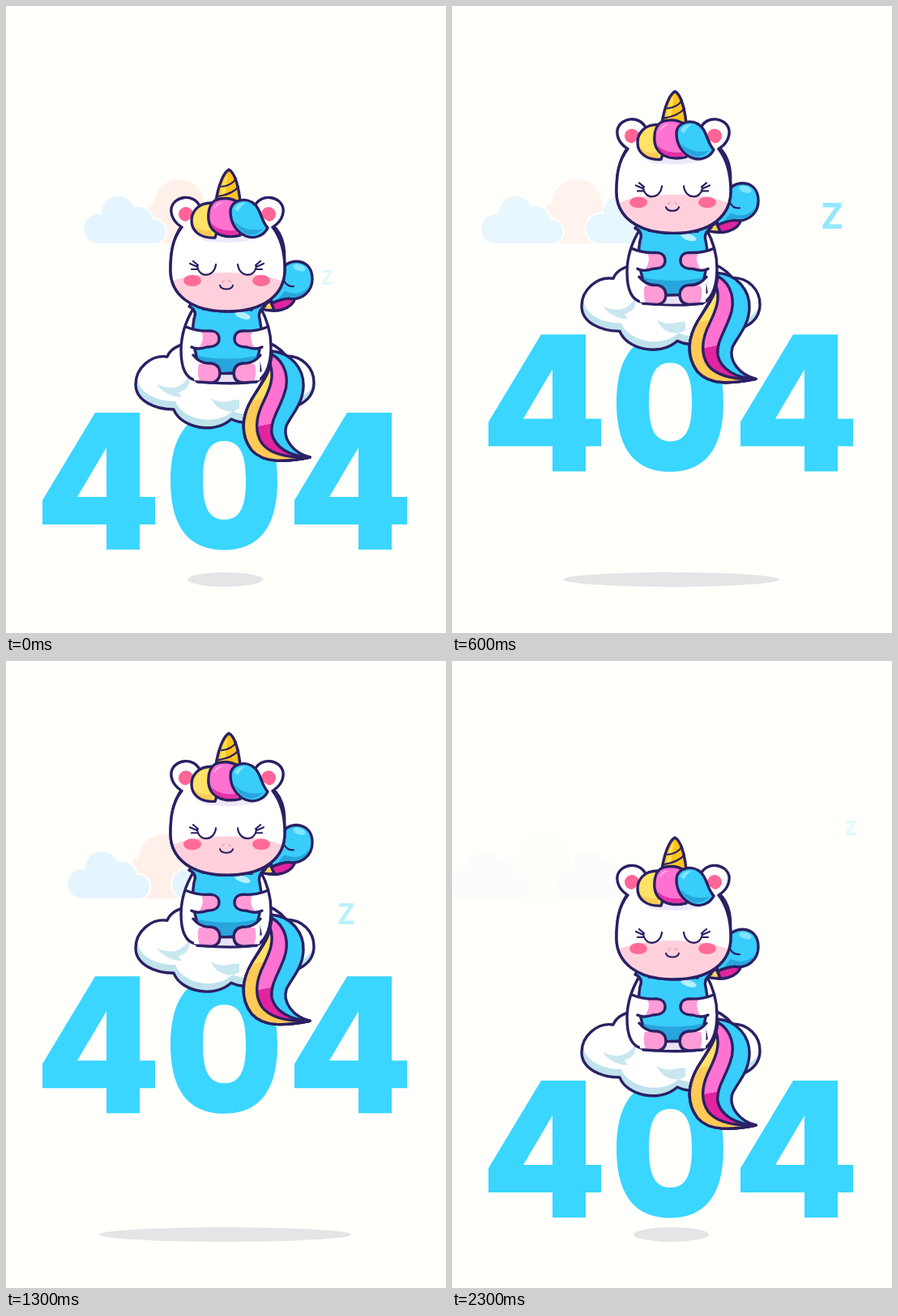
Write an HTML page that moves like this. It is 543 px wide and 774 px high and loops after 2.4 s.

```html
<!DOCTYPE html>
<html lang="en">
<head>
<meta charset="utf-8">
<title>404</title>
<style>
html, body { margin: 0; width: 100%; height: 100%; overflow: hidden; background: #fffffc; }
svg { display: block; width: 543px; height: 774px; }
.line { stroke: #2b2063; stroke-width: 3.4; stroke-linecap: round; stroke-linejoin: round; }
.thin { stroke-width: 2.2; }
.open { fill: none; }
.blue { fill: #38cdfb; }
.deep { fill: #27a5dc; }
.shine { fill: #7fe4ff; }
.pink { fill: #ff72d2; }
.skin { fill: #ff9bd6; }
.white { fill: #fff; }
#z { font: 700 25px "Open Sans", "Noto Sans", sans-serif; text-anchor: middle; fill: #3ad6ff; }
</style>
</head>
<body>
<svg viewBox="0 0 543 774">
  <defs>
    <path id="puff" d="M18 294A19 19 0 0 1 23 256A21.3 21.3 0 0 1 64 247A20 20 0 0 1 88 263A15.7 15.7 0 0 1 92 294Z" fill="#e4f5ff" stroke="#fffffc" stroke-width="2"/>
    <path id="seat" d="M199 433C179 430 160 447 160 467C160 487 183 498 207 498C215 520 256 530 278 510C295 518 320 514 330 495C350 502 380 490 380 465C380 447 366 432 346 432C330 412 300 405 270 415C240 412 206 414 199 433Z"/>
    <path id="face" d="M217 271C205 288 203 306 203 326C203 356 228 377 273 377C319 377 344 356 344 325C344 303 339 286 329 271C312 248 236 248 217 271Z"/>
    <path id="pillow" d="M232 386C235 379 233 374 226 371C230 364 239 364 243 374Q273 371 303 375C306 365 314 364 320 370C314 374 311 379 313 386Q318 408 311 432L314 450Q272 456 234 452L235 432Q228 408 232 386Z"/>
    <path id="four" d="M110 502H165V606H184V640H165V671H124V640H45V610ZM124 545L88 606H124Z" fill-rule="evenodd"/>
    <clipPath id="inSeat"><use href="#seat"/></clipPath>
    <clipPath id="inFace"><use href="#face"/></clipPath>
    <clipPath id="inPillow"><use href="#pillow"/></clipPath>
    <linearGradient id="tailPink" gradientUnits="userSpaceOnUse" x1="300" y1="516" x2="302" y2="526">
      <stop offset=".5" stop-color="#ff72d2"/><stop offset=".5" stop-color="#e2249f"/>
    </linearGradient>
    <linearGradient id="tailGold" gradientUnits="userSpaceOnUse" x1="300" y1="484" x2="302" y2="492">
      <stop offset=".5" stop-color="#ffe266"/><stop offset=".5" stop-color="#ffca55"/>
    </linearGradient>

    <!-- Left-hand parts, mirrored for the right -->
    <g id="ear">
      <path class="line white" d="M219 274C207 268 203 258 204 250C207 234 232 231 239 247Z"/>
      <circle cx="222" cy="257" r="9" fill="#ff6596"/>
    </g>
    <g id="eye">
      <ellipse cx="230" cy="339" rx="11" ry="7" fill="#ff6b98"/>
      <path class="line open thin" d="M236 320C237 336 257 336 259 319M237 325L229 325M236 322L227 318M237 320L231 315"/>
    </g>
    <g id="limbs">
      <path class="white" d="M224 397Q240 402 252 401C260 401 263 406 263 411C263 418 256 421 248 421Q238 424 224 423Z"/>
      <path class="skin" d="M241 401H252C260 401 263 406 263 411C263 418 256 421 248 421L238 422Q246 411 241 401Z"/>
      <path class="line open" d="M222 396Q236 402 252 401C260 401 263 406 263 411C263 418 256 421 248 421Q236 425 229 421"/>
      <path class="white" d="M231 432Q240 442 252 441Q264 442 264 454Q263 465 252 465L232 462Z"/>
      <path class="skin" d="M238 442Q252 440 258 442Q264 446 264 454Q263 465 252 465L239 463Q235 452 238 442Z"/>
      <path class="line open" d="M231 431Q240 442 252 441Q264 442 264 454Q263 465 252 465L236 464"/>
    </g>
  </defs>

  <g id="sky">
    <g fill="#fff1ea">
      <circle cx="120" cy="245" r="31"/>
      <rect x="81" y="244" width="84" height="49.5" rx="6"/>
    </g>
    <use href="#puff" x="129"/>
    <use href="#puff"/>
  </g>
  <ellipse id="shadow" cx="270.5" cy="708" ry="9" fill="#e5e5e7"/>
  <text id="z">Z</text>

  <g id="float">
    <g fill="#3ad6ff" role="img" aria-label="404">
      <use href="#four"/>
      <path fill-rule="evenodd" d="M203 586C203 527 228 500 269.5 500S335 527 335 586S311 671.5 269 671.5S203 645 203 586ZM243 586C243 618 250 634 269.5 634S296 618 296 586S289 537 269.5 537S243 553 243 586Z"/>
      <use href="#four" x="311"/>
    </g>

    <!-- Cloud seat -->
    <use href="#seat" fill="#bfe2ec"/>
    <g clip-path="url(#inSeat)"><use href="#seat" class="white" x="2" y="-10"/></g>
    <g fill="#c9e7ef">
      <path d="M186 467Q196 472 208 471Q220 468 226 457Q229 472 213 477L217 483Q197 482 186 467Z"/>
      <path d="M253 484Q263 490 273 488Q281 486 288 486V497Q280 502 272 500Q258 497 253 484Z"/>
    </g>
    <use href="#seat" class="line open"/>

    <!-- Tail -->
    <g class="line">
      <path class="blue" d="M328 426C352 428 368 448 367 470C366 492 352 505 346 518C341 535 355 552 375 557C345 563 318 565 303 548C288 528 292 505 303 486C314 468 326 452 328 426Z"/>
      <path fill="url(#tailPink)" d="M328 430C346 440 350 462 343 480C336 500 326 512 328 528C332 545 350 556 375 557C345 563 318 565 303 548C288 528 292 505 303 486C314 468 326 452 328 430Z"/>
      <path fill="url(#tailGold)" d="M326 442C332 460 324 475 318 488C308 508 306 525 316 540C326 553 345 558 375 557C345 563 318 565 303 548C288 528 292 505 303 486C314 468 324 456 326 442Z"/>
    </g>

    <!-- Mane behind the head -->
    <g class="line">
      <path fill="#e2249f" d="M314 373C332 380 353 375 357 360L325 354Z"/>
      <path fill="#ffd65c" d="M314 373Q323 377 331 375L326 364Z"/>
      <path class="blue" d="M322 266C340 275 346 296 343 322C352 311 378 312 378 337C378 353 364 364 349 361Q338 362 328 367L316 300Z"/>
      <path class="open thin" d="M343 339Q347 347 355 346"/>
    </g>
    <path class="deep" d="M344 352Q362 360 374 346Q366 362 349 359L336 361Z"/>
    <ellipse class="shine" cx="362" cy="323" rx="8" ry="4" transform="rotate(18 362 323)"/>

    <!-- Body and pillow -->
    <path class="line white" d="M232 372C221 390 216 407 216 425C216 450 224 460 234 462C255 467 300 467 312 462C322 455 327 440 327 420C327 400 321 385 314 372Z"/>
    <path d="M262 455H283L286 464H260Z" fill="#e7e1f3"/>
    <use href="#pillow" class="blue"/>
    <g clip-path="url(#inPillow)"><path class="deep" d="M228 430Q272 441 318 430V460H228Z"/></g>
    <ellipse cx="292" cy="382" rx="10" ry="4" fill="#b5f0ff" transform="rotate(18 292 382)"/>
    <use href="#pillow" class="line open"/>
    <use href="#limbs"/>
    <use href="#limbs" transform="matrix(-1 0 0 1 545 0)"/>

    <!-- Head -->
    <use href="#face" class="line white"/>
    <use href="#ear"/>
    <use href="#ear" transform="matrix(-1 0 0 1 546 0)"/>
    <use href="#face" class="white"/>
    <g clip-path="url(#inFace)">
      <ellipse cx="273" cy="364" rx="95" ry="35" fill="#ffd0dc"/>
      <path d="M232 278Q240 292 258 291Q280 294 308 288L316 276Z" fill="#eee8fa"/>
    </g>
    <path class="line open" d="M217 273C205 288 203 306 203 326C203 356 228 377 273 377C319 377 344 356 344 325C344 303 339 286 329 273"/>
    <use href="#eye"/>
    <use href="#eye" transform="matrix(-1 0 0 1 545 0)"/>
    <path class="line open thin" d="M264 345C266 351 278 351 280 345"/>
    <path d="M267 341l2-2M275 339l2 2" stroke="#ff9db8" stroke-width="1.8" stroke-linecap="round"/>

    <!-- Horn -->
    <path class="line" fill="#ffc31f" d="M259 241C262 222 268 206 275 202C282 205 287 222 289 241Z"/>
    <path d="M264 234Q267 214 274 207Q272 220 270 236Z" fill="#ffe04f"/>
    <path class="line open thin" d="M266 223Q278 222 284 213M262 235Q280 232 287 223"/>

    <!-- Fringe -->
    <path class="line" fill="#ffe266" d="M254 243C237 243 229 254 229 265C229 278 240 287 258 286L266 260Z"/>
    <path d="M232 271Q240 280 254 277V284Q237 284 232 271Z" fill="#ffca55"/>
    <path class="line pink" d="M264 238C252 240 249 252 250 264C252 280 268 288 289 283L296 254C288 239 276 236 264 238Z"/>
    <path d="M253 268Q263 279 283 277L287 282Q259 286 253 268Z" fill="#e62fa6"/>
    <path d="M256 252Q258 242 268 242Q260 246 256 252Z" fill="#ffb0e8"/>
    <path class="line blue" d="M277 254C277 239 297 235 307 245C315 252 314 264 323 274C318 284 306 288 296 284C284 279 277 267 277 254Z"/>
    <path class="deep" d="M282 266Q296 280 318 275Q306 286 296 281Q287 277 282 266Z"/>
    <path class="shine" d="M282 250Q286 242 296 243Q290 246 286 254Z"/>
  </g>
</svg>
<script>
const $ = id => document.getElementById(id);

// Linear interpolation through [position, value] points
function track(x, points) {
  let i = 1;
  while (i < points.length - 1 && x > points[i][0]) i++;
  const [[x0, y0], [x1, y1]] = [points[i - 1], points[i]];
  return y0 + (y1 - y0) * (x - x0) / (x1 - x0);
}

const LOOP = 2400, STEP = 100;
const beats = [[0, 0], [1500, 15], [1800, 17], [1900, 18], [2300, 21], [2400, 22]];
const bob = [[0, 0], [10, -161], [21, 16], [22, 0]];
const spread = [[-161, 445], [-74, 204], [0, 93], [17, 93]];
const zX = [[0, 396.5], [4, 443.5], [7, 482], [8, 486], [11, 495]];
const zY = [[0, 334.5], [4, 290], [7, 244], [8, 230], [11, 194]];

function draw(now) {
  const time = Math.floor(now % LOOP / STEP) * STEP;
  const beat = track(time, beats), drift = beat % 11;

  const lift = track(beat, bob);
  $("float").setAttribute("transform", `translate(0 ${lift})`);
  $("shadow").setAttribute("rx", track(lift, spread) / 2);

  $("sky").setAttribute("transform", `translate(${94 - 10 * drift} 0)`);
  $("sky").setAttribute("opacity", Math.min(1, 1 - (drift - 5) * .175));

  const swell = 5 - Math.abs(drift - 5), height = 18 + 3.5 * swell, z = $("z");
  z.style.fontSize = height / .714 + "px";
  z.setAttribute("x", track(drift, zX));
  z.setAttribute("y", track(drift, zY) + height / 2);
  z.setAttribute("opacity", Math.max(0, .14 + .1 * swell));

  requestAnimationFrame(draw);
}
draw(performance.now());
</script>
</body>
</html>
```
